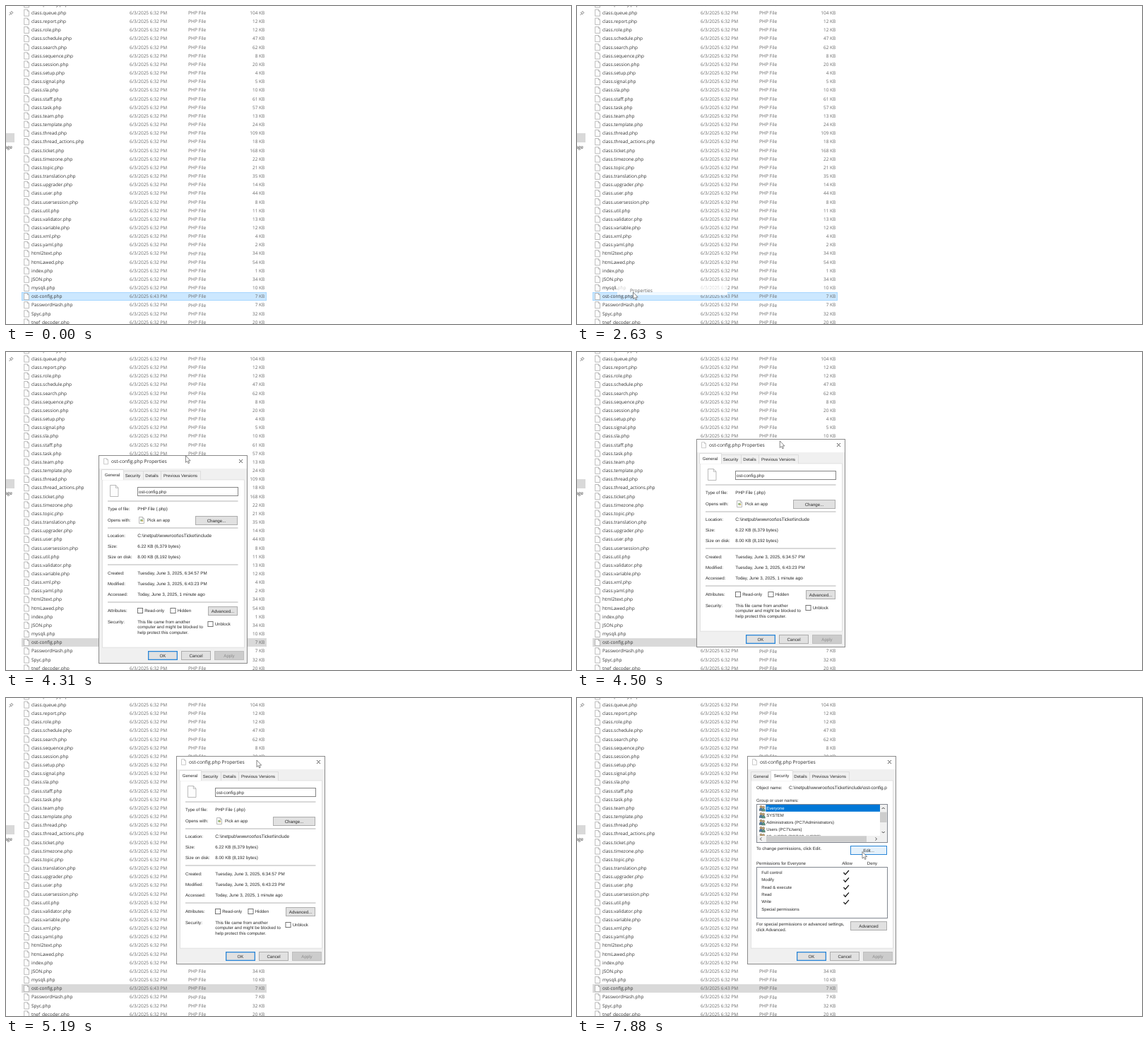
Write an HTML page that moves like this. It is 800 px wide and 450 px high and loops after 8 s.

```html
<!DOCTYPE html>
<html lang="en">
<head>
<meta charset="utf-8">
<title>File properties</title>
<style>
  html, body { margin: 0; width: 100%; height: 100%; overflow: hidden; background: #fff; }
  svg { display: block; }
  #stage { width: 100vw; height: 100vh; }
  text { white-space: pre; text-rendering: geometricPrecision; }
  .ui { font-family: "Open Sans", "Noto Sans", sans-serif; }
  .dlg { font-family: "Liberation Sans", Arial, sans-serif; }
</style>
</head>
<body>
<svg id="stage" viewBox="0 0 800 450" xmlns="http://www.w3.org/2000/svg"></svg>
<script>
const LOOP = 8000, STEP = 62.5;
const ROW = 12.165, FIRST = 9.6, SELECTED = 33;

// Markup helpers; text is placed by its vertical centre.
const text = (x, y, s, { size = 6.15, fill = '#2a2a2a', anchor = 'start', cls = 'dlg' } = {}) =>
  `<text class="${cls}" x="${x}" y="${y + size * 0.35}" font-size="${size}" fill="${fill}" text-anchor="${anchor}">${s}</text>`;
const rect = (x, y, w, h, fill, stroke = 'none', sw = 0.6, extra = '') =>
  `<rect x="${x}" y="${y}" width="${w}" height="${h}" fill="${fill}" stroke="${stroke}" stroke-width="${sw}" ${extra}/>`;
// A box whose border lies inside its bounds, on whole pixels.
const box = (x, y, w, h, fill, stroke, sw = 1, extra = '') =>
  rect(x + sw / 2, y + sw / 2, w - sw, h - sw, fill, stroke, sw, extra);
const path = (d, stroke, sw = 0.7, fill = 'none') =>
  `<path d="${d}" fill="${fill}" stroke="${stroke}" stroke-width="${sw}"/>`;
const group = (id, body) => `<g id="${id}">${body}</g>`;
const clip = (x, y, w, h, body) =>
  `<svg x="${x}" y="${y}" width="${w}" height="${h}" viewBox="${x} ${y} ${w} ${h}">${body}</svg>`;

function sheet(x, y, w, h, stroke = '#a0a0a0') {
  const f = w * 0.32;
  return path(`M${x} ${y}h${w - f}l${f} ${f}v${h - f}h${-w}zM${x + w - f} ${y}v${f}h${f}`, stroke, 0.7, '#fdfdfd');
}

function button(x, y, w, h, label, { fill = '#e1e1e1', stroke = '#adadad', sw = 1, color = '#2a2a2a', id = '' } = {}) {
  return box(x, y, w, h, fill, stroke, sw, id && `id="${id}"`) +
    text(x + w / 2, y + h / 2, label, { anchor: 'middle', fill: color });
}

// File list: name, size in KB.
const files = `class.priority 5|class.queue 104|class.report 12|class.role 12|class.schedule 47|class.search 62|
class.sequence 8|class.session 20|class.setup 4|class.signal 5|class.sla 10|class.staff 61|class.task 57|class.team 13|
class.template 24|class.thread 109|class.thread_actions 18|class.ticket 168|class.timezone 22|class.topic 21|
class.translation 35|class.upgrader 14|class.user 44|class.usersession 8|class.util 11|class.validator 13|
class.variable 12|class.xml 4|class.yaml 2|html2text 34|htmLawed 54|index 1|JSON 34|mysqli 10|ost-config 7|
PasswordHash 7|Spyc 32|tnef_decoder 20`.split('|').map(s => s.trim().split(' '));

function fileRow([name, kb], n) {
  const i = n - 1, y = FIRST + i * ROW, soft = { cls: 'ui', size: 6.5, fill: '#696969' };
  return sheet(25.7, y - 4.6, 6.8, 9.2) +
    text(36, y, name + '.php', { cls: 'ui', size: 6.5, fill: '#333' }) +
    text(175, y, `6/3/2025 6:${i === SELECTED ? 43 : 32} PM`, soft) +
    text(258, y, 'PHP File', { ...soft, size: 6.7 }) +
    text(366.3, y, kb + ' KB', { ...soft, anchor: 'end' });
}

const explorer =
  path('M4.5 13l2-2M5.2 9.2l3 3M6.3 9.6l1.6-2.2l2 2l-2.2 1.6', '#888', 1) +
  rect(0, 180, 12, 13, '#d9d9d9') +
  text(9, 200, 'Storage', { cls: 'ui', size: 6.5, anchor: 'end', fill: '#333' }) +
  box(22, 405, 347, 12, '#cce8ff', '#99d1ff', 0.8, 'id="selection"') +
  files.map(fileRow).join('');

// Context menu, laid out upwards from its last item.
const MENU = { x: 56, w: 158, bottom: 408.7, item: 12.1, gap: 4 };
const menuItems = ['Open with...', 'Share', '-', 'Give access to', 'Restore previous versions', '-', 'Send to', '-',
  'Cut', 'Copy', '-', 'Create shortcut', 'Delete', 'Rename', '-', 'Properties'];

function buildMenu() {
  let y = MENU.bottom, body = '';
  for (const name of [...menuItems].reverse()) {
    if (name === '-') {
      y -= MENU.gap;
      body += path(`M72 ${y + 2}H211`, '#a5a5a5', 0.5);
      continue;
    }
    y -= MENU.item;
    body += text(75, y + 6, name, { cls: 'ui', size: 6.5 });
    if (/^(Give|Send)/.test(name)) body += path(`M206 ${y + 4}l2 2l-2 2`, '#333');
  }
  return rect(MENU.x, y - 1.5, MENU.w, MENU.bottom - y + 3, '#eee', '#a0a0a0') + body;
}
const menuItem = rect(MENU.x + 1, MENU.bottom - 12.5, MENU.w - 2, 12.8, '#fff') +
  text(75, 402.3, 'Properties', { cls: 'ui', size: 6.6 });

// Properties dialog, in coordinates relative to its top left corner.
const tabs = [['General', 4, 29], ['Security', 33, 29], ['Details', 62, 25], ['Previous Versions', 87, 56]];

function tabStrip(active) {
  const tab = ([name, x, w], i) => {
    const on = i === active, top = on ? 20.5 : 22.5, grow = on ? 1 : 0;
    return path(`M${x - grow + 0.5} 35V${top}h${w + 2 * grow}V35`, '#d9d9d9', 0.8, on ? '#fff' : '#f0f0f0') +
      text(x + w / 2, on ? 27.8 : 28.8, name, { size: 6, anchor: 'middle' });
  };
  return tabs.map((t, i) => i === active ? '' : tab(t, i)).join('') + tab(tabs[active], active);
}

const rule = y => path(`M12 ${y}H196.5`, '#a0a0a0', 0.8);
const field = (y, label, value, size = 6.25) => text(12, y, label) + text(54.3, y, value, { size });
const checkbox = (x, y, label) => box(x, y, 8, 8, '#fff', '#666', 0.9) + text(x + 10.2, y + 4, label);

const generalPage =
  sheet(15.5, 42.5, 11.5, 16) +
  box(54, 45, 143, 13, '#fff', '#858585') + text(56, 51.5, 'ost-config.php', { size: 6.2 }) +
  [65, 103, 155, 208].map(rule).join('') +
  field(76.2, 'Type of file:', 'PHP File (.php)') +
  text(12, 91.5, 'Opens with:') + text(68, 91.5, 'Pick an app') +
  sheet(56.5, 87.5, 7, 9) + rect(58.2, 90.8, 3.6, 2.8, '#8fb580') + rect(60, 92.2, 2.2, 1.6, '#d9b766') +
  button(136, 86, 60, 13, 'Change...') +
  field(113.7, 'Location:', 'C:\\inetpub\\wwwroot\\osTicket\\include', 6.5) +
  field(128.8, 'Size:', '6.22 KB (6,379 bytes)') +
  field(144, 'Size on disk:', '8.00 KB (8,192 bytes)') +
  field(166.5, 'Created:', 'Tuesday, June 3, 2025, 6:34:57 PM') +
  field(181.6, 'Modified:', 'Tuesday, June 3, 2025, 6:43:23 PM') +
  field(196.8, 'Accessed:', 'Today, June 3, 2025, 1 minute ago') +
  text(12, 219.6, 'Attributes:') + checkbox(54, 216, 'Read-only') + checkbox(100.5, 216, 'Hidden') +
  button(154, 214, 42, 13, 'Advanced...') +
  field(235.4, 'Security:', 'This file came from another', 6.15) +
  text(54.3, 243, 'computer and might be blocked to') +
  text(54.3, 250.6, 'help protect this computer.') +
  checkbox(153.5, 235, 'Unblock');

const person = (x, y, c) => `<circle cx="${x}" cy="${y - 2}" r="1.7" fill="#c9a26b" stroke="#555" stroke-width=".4"/>` +
  path(`M${x - 2.4} ${y + 3.6}q0-4 2.4-4t2.4 4z`, '#444', 0.4, c);
const users = ['Everyone', 'SYSTEM', 'Administrators (PC7\\Administrators)', 'Users (PC7\\Users)', 'IIS_IUSRS (PC7\\IIS_IUSRS)'];
const userRow = (name, i) => {
  const y = 74 + i * 9.9;
  return person(18.5, y, '#4d7fa8') + person(22, y + 0.6, '#5b9a86') +
    text(26.2, y, name, { size: 6, fill: i ? '#2a2a2a' : '#fff' });
};
const rights = ['Full control', 'Modify', 'Read &amp; execute', 'Read', 'Write', 'Special permissions'];
const rightRow = (name, i) => {
  const y = 164.5 + i * 10.45;
  return text(19.3, y, name, { size: 6 }) + (i < 5 ? path(`M135.5 ${y + 0.5}l2.4 2.8l5-5.8`, '#111', 1.3) : '');
};
const chevron = (x, y, dx, dy) =>
  path(`M${x - dx - 2 * !dx} ${y - dy - 2 * !dy}L${x + dx} ${y + dy}L${x - dx + 2 * !dx} ${y - dy + 2 * !dy}`, '#444', 1);

const securityPage =
  text(12, 45.2, 'Object name:') +
  clip(57, 40, 140, 11, text(58, 45.2, 'C:\\inetpub\\wwwroot\\osTicket\\include\\ost-config.php', { size: 6.45 })) +
  text(12, 62.8, 'Group or user names:') +
  box(12, 68, 186, 55, '#fff', '#828790') +
  clip(13, 69, 174, 44, rect(25.3, 69, 162, 9.8, '#0078d7') + users.map(userRow).join('')) +
  rect(187, 69, 10, 53, '#f0f0f0') + rect(13, 113, 174, 9, '#f0f0f0') +
  rect(187, 79.5, 9.5, 14.5, '#cdcdcd') + rect(26, 113.3, 142, 8.4, '#cdcdcd') +
  chevron(191.7, 74, 0, -1) + chevron(191.7, 108, 0, 1) + chevron(18.3, 117.5, -1, 0) + chevron(181.5, 117.5, 1, 0) +
  text(12, 131, 'To change permissions, click Edit.') +
  button(145, 127, 52, 13, 'Edit...', { id: 'edit' }) +
  text(12, 152, 'Permissions for Everyone') +
  text(140.5, 152, 'Allow', { anchor: 'middle' }) + text(176, 152, 'Deny', { anchor: 'middle' }) +
  box(12, 157, 186, 73, '#fff', '#828790') + rights.map(rightRow).join('') +
  text(12, 238, 'For special permissions or advanced settings,') + text(12, 245.5, 'click Advanced.') +
  button(145, 234, 52, 13, 'Advanced');

const dialog =
  box(-1, 0, 211, 295, '#f0f0f0', '#8a8a8a') + rect(0, 1, 209, 18, '#fff') +
  sheet(6.5, 4.7, 6, 8, '#b5b5b5') +
  text(17, 9, 'ost-config.php Properties', { cls: 'ui', size: 6.7 }) +
  path('M198 6l5 5M203 6l-5 5', '#333', 0.8) +
  box(4, 34.5, 202, 238, '#fff', '#dcdcdc', 0.8) +
  group('tabGeneral', tabStrip(0)) + group('tabSecurity', tabStrip(1)) +
  group('general', generalPage) + group('security', securityPage) +
  button(69, 277, 42, 13, 'OK', { stroke: '#2a86d8', sw: 1.3 }) +
  button(116, 277, 42, 13, 'Cancel') +
  button(163, 277, 42, 13, 'Apply', { fill: '#ccc', stroke: '#bfbfbf', color: '#8c8c8c' });

const arrow = path('M0 0V9.6L2.2 7.6L3.7 11L5.2 10.3L3.8 7.1H6.7Z', '#555', 0.7, '#fff');
const spinner = '<circle r="4" fill="none" stroke="#3489d8" stroke-width="2.6"/>' +
  '<circle id="glint" r="4" fill="none" stroke="#a9d3f5" stroke-width="2.4" stroke-dasharray="6 30"/>';

const stage = document.getElementById('stage');
stage.innerHTML = rect(0, 0, 800, 450, '#fff') + explorer +
  group('menu', buildMenu()) + group('menuItem', menuItem) + group('dialog', dialog) +
  group('arrow', arrow) + group('spinner', spinner);
const el = {};
stage.querySelectorAll('[id]').forEach(n => el[n.id] = n);

// Keys: time, x, y; a trailing 1 eases the move that ends there.
const cursorKeys = [[400, 64, 454], [800, 58, 416, 1], [1190, 55, 411, 1], [1940, 55, 411], [2450, 79.5, 405, 1],
  [3500, 79.5, 405], [3630, 192, 188], [4060, 192, 188], [4310, 254, 147], [4750, 331, 98], [5000, 355, 88],
  [5300, 355, 88], [6000, 283, 110, 1], [6850, 283, 110], [7550, 404, 217.5, 1]];
const dialogKeys = [[4060, 80, 181], [4310, 132, 146], [4750, 219, 92], [5000, 242, 82]];

function along(keys, t) {
  if (t <= keys[0][0]) return keys[0].slice(1, 3);
  const i = keys.findIndex(k => k[0] >= t);
  if (i < 0) return keys[keys.length - 1].slice(1, 3);
  const [t0, x0, y0] = keys[i - 1], [t1, x1, y1, ease] = keys[i];
  let p = (t - t0) / (t1 - t0);
  if (ease) p = p * p * (3 - 2 * p);
  return [x0 + (x1 - x0) * p, y0 + (y1 - y0) * p];
}
const ramp = (t, a, b) => Math.min(1, Math.max(0, (t - a) / (b - a)));
const show = (node, opacity) => {
  node.setAttribute('display', opacity > 0 ? 'inline' : 'none');
  node.setAttribute('opacity', +opacity);
};
const move = (node, x, y) => node.setAttribute('transform', `translate(${x} ${y})`);
const paint = (node, fill, stroke) => {
  node.setAttribute('fill', fill);
  node.setAttribute('stroke', stroke);
};

function draw(time) {
  const t = Math.floor((time + 3) / STEP) * STEP;
  const [cx, cy] = along(cursorKeys, t), [dx, dy] = along(dialogKeys, t).map(Math.round);

  show(el.menu, t < 2570 ? ramp(t, 1370, 1560) : 0);
  const hovered = t > 1940 && cx > MENU.x + 2 && cy < MENU.bottom;
  show(el.menuItem, hovered ? 1 - ramp(t, 2580, 2760) : 0);

  if (t < 2870) paint(el.selection, '#cce8ff', '#99d1ff');
  else paint(el.selection, '#d9d9d9', '#d9d9d9');

  show(el.dialog, ramp(t, 2800, 3000));
  move(el.dialog, dx, dy);
  const picked = t >= 6250, loaded = t >= 6500;
  show(el.tabGeneral, !picked);
  show(el.tabSecurity, picked);
  show(el.general, !loaded);
  show(el.security, loaded);

  const ex = cx - dx, ey = cy - dy;
  if (ex > 145 && ex < 197 && ey > 127 && ey < 140) paint(el.edit, '#e5f1fb', '#2a86d8');
  else paint(el.edit, '#e1e1e1', '#adadad');

  const busy = t >= 6310 && !loaded;
  show(el.arrow, !busy);
  show(el.spinner, busy);
  move(el.arrow, cx, cy);
  move(el.spinner, cx + 1, cy + 4);
  el.glint.setAttribute('transform', `rotate(${t * 0.4 % 360})`);
}

const start = performance.now();
function tick() {
  draw((performance.now() - start) % LOOP);
  requestAnimationFrame(tick);
}
tick();
</script>
</body>
</html>
```
